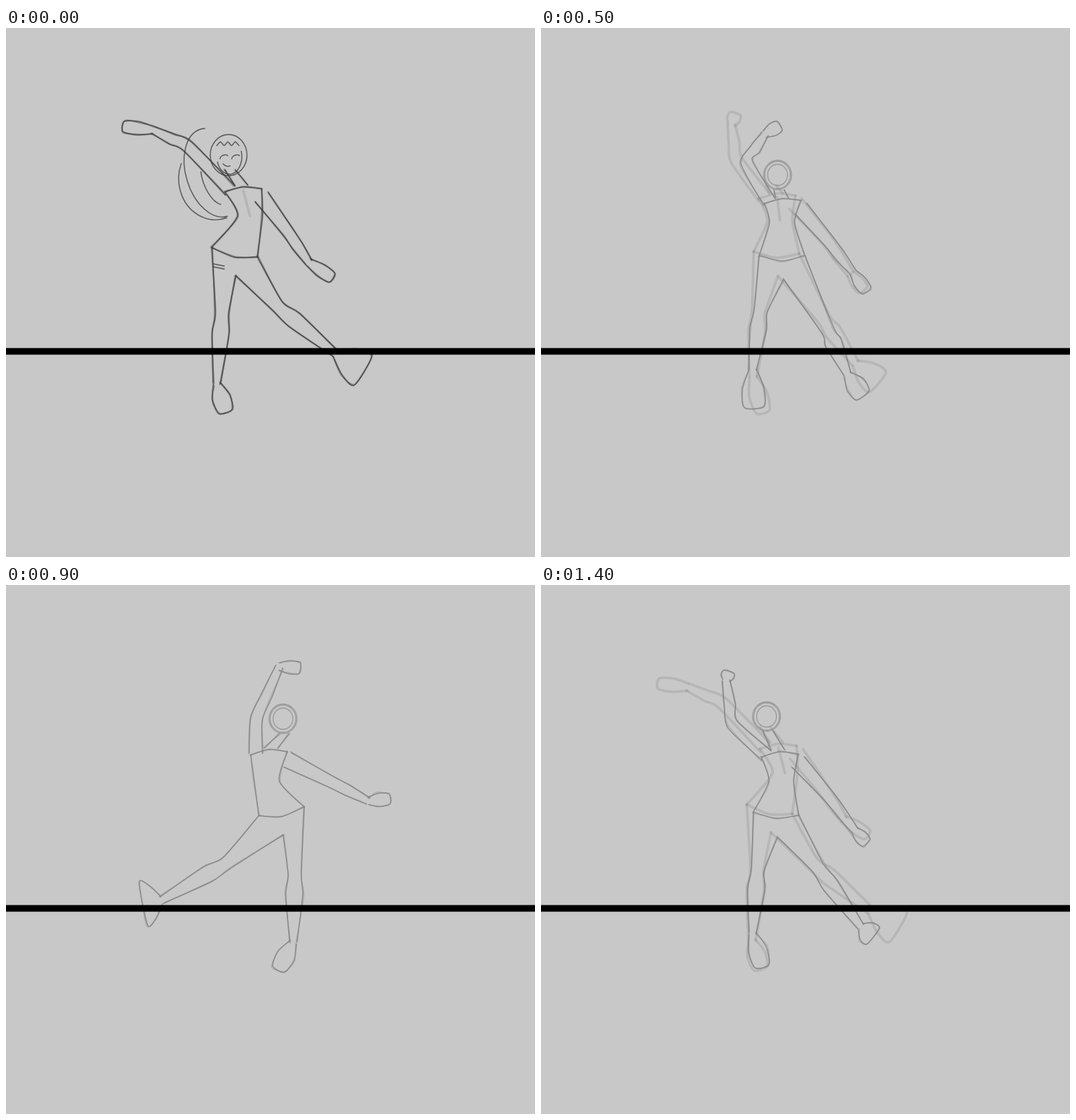
These frames come from a looping animation (720 by 720 pixels, 1.5 s). An HTML page with a canvas:

```html
<!DOCTYPE html>
<html lang="en">
<head>
<meta charset="utf-8">
<style>
  html, body { margin: 0; width: 100%; height: 100%; overflow: hidden; background: #c8c8c8; }
  canvas { display: block; }
</style>
</head>
<body>
<canvas id="stage" width="720" height="720"></canvas>
<script>
const ctx = document.getElementById('stage').getContext('2d');
const STEP = 100, STEPS = 15;
const GRAY = '#838383', DARK = '#3c3c3c';

// Key poses: only the joints. Outlines, drawings in between and detail follow by rule.
// "onion" names another step that shines through faintly.
const JOINTS = 'head chest waist pelvis elbowL wristL tipL elbowR wristR tipR kneeL ankleL toeL kneeR ankleR toeR'.split(' ');
const poses = [
  { at: 0, onion: 0, joints: '303,173 323,221 332,256 311,305 247,161 200,139 160,134 384,278 412,319 444,340 294,388 287,484 299,522 369,378 448,443 486,466' },
  { at: 3, joints: '303,185 316,222 325,259 315,302 255,173 217,120 203,101 388,283 420,331 440,349 292,390 286,485 306,524 377,378 436,442 473,467' },
  { at: 5, onion: 4, joints: '322,200 329,237 328,265 328,310 280,183 305,144 325,133 393,292 425,333 443,358 299,385 288,465 290,516 390,411 417,471 438,500' },
  { at: 7, joints: '341,187 339,228 342,268 348,311 313,170 350,127 357,109 412,270 452,302 484,321 290,390 261,468 229,480 374,389 385,473 381,521' },
  { at: 9, joints: '377,182 358,229 355,267 375,308 341,182 372,111 400,113 441,267 493,294 522,291 301,378 212,429 187,434 393,394 391,486 371,523' },
  { at: 11, joints: '357,186 356,224 354,263 362,306 328,179 357,123 379,103 430,278 463,301 497,319 311,378 271,442 248,462 390,402 390,481 370,523' },
  { at: 14, onion: 0, joints: '307,179 325,232 327,267 320,311 261,190 252,130 256,118 392,288 427,334 443,351 295,388 288,474 301,519 377,385 435,465 452,478' }
];
for (const pose of poses)
  pose.points = pose.joints.split(' ').map(p => p.split(',').map(Number));

const add = (p, x, y) => [p[0] + x, p[1] + y];
const mix = (a, b, u) => a.map((v, k) => v + (b[k] - v) * u);

// Joints at any step, on a closed spline through the key poses.
function jointsAt(step) {
  const n = poses.length, i = poses.findLastIndex(p => p.at <= step);
  const [a, b, c, d] = [-1, 0, 1, 2].map(k => poses[(i + k + n) % n]);
  const u = (step - b.at) / ((c.at || STEPS) - b.at);
  const spline = (p, q, r, s) => q + u / 2 * (r - p
    + u * (2 * p - 5 * q + 4 * r - s + u * (3 * (q - r) + s - p)));
  return Object.fromEntries(JOINTS.map((name, j) => [name, [0, 1].map(k =>
    spline(a.points[j][k], b.points[j][k], c.points[j][k], d.points[j][k]))]));
}

// Both edges of a band with the given half-width at each joint.
function edges(joints, widths) {
  return [1, -1].map(side => joints.map((p, i) => {
    const from = joints[Math.max(0, i - 1)], to = joints[Math.min(joints.length - 1, i + 1)];
    const dx = to[0] - from[0], dy = to[1] - from[1];
    const k = side * widths[i] / (Math.hypot(dx, dy) || 1);
    return add(p, -dy * k, dx * k);
  }));
}

function paddle(start, end, widths) {
  const [left, right] = edges([start, mix(start, end, 0.5), end], widths);
  return [...left, ...right.reverse()];
}

function arm(shoulder, elbow, wrist, tip, width) {
  const joints = [shoulder, elbow, mix(elbow, wrist, 0.45), wrist];
  return [...edges(joints, [width, 8, 7.5, 5]), paddle(wrist, tip, [5, 9, 7])];
}

function leg(tops, knee, ankle, toe) {
  const joints = [mix(...tops, 0.5), knee, mix(knee, ankle, 0.3), ankle];
  const sides = edges(joints, [0, 9, 11.5, 5]);
  sides.forEach((side, i) => { side[0] = tops[i]; });
  const flare = 9 + Math.max(0, 475 - ankle[1]) * 0.45; // a lifted foot shows its length
  return [...sides, paddle(ankle, toe, [5, flare / 2 + 8, flare])];
}

function figure(j) {
  const tilt = (j.waist[0] - j.pelvis[0]) * 0.3;
  const hipL = add(j.pelvis, -31, -tilt), hipR = add(j.pelvis, 31, tilt);
  const crotch = add(j.pelvis, 2, 32);
  const chestL = add(j.chest, -25, 2), chestR = add(j.chest, 25, -2);
  const neck = side => [add(j.head, 2 + side * 7, 20), add(mix(j.head, j.chest, 0.85), side * 9, 0)];
  return [
    [chestL, add(j.waist, -17, 0), hipL],
    [chestR, add(j.waist, 17, 0), hipR],
    [hipL, add(j.pelvis, 0, 7), hipR],
    [chestL, add(j.chest, 0, -5), chestR],
    neck(-1), neck(1),
    ...arm(add(chestL, 7, -2), j.elbowL, j.wristL, j.tipL, 9),
    ...arm(add(chestR, 0, 11), j.elbowR, j.wristR, j.tipR, 11),
    ...leg([hipL, crotch], j.kneeL, j.ankleL, j.toeL),
    ...leg([crotch, hipR], j.kneeR, j.ankleR, j.toeR)
  ];
}

function pen(color, width, alpha) {
  ctx.strokeStyle = color;
  ctx.lineWidth = width;
  ctx.globalAlpha = alpha;
}

function curve(points) {
  const at = i => points[Math.max(0, Math.min(points.length - 1, i))];
  ctx.beginPath();
  ctx.moveTo(...points[0]);
  for (let i = 0; i < points.length - 1; i++) {
    const [a, b, c, d] = [at(i - 1), at(i), at(i + 1), at(i + 2)];
    ctx.bezierCurveTo(
      b[0] + (c[0] - a[0]) / 8, b[1] + (c[1] - a[1]) / 8,
      c[0] - (d[0] - b[0]) / 8, c[1] - (d[1] - b[1]) / 8, ...c);
  }
  ctx.stroke();
}

function arc([x, y], rx, ry, from = 0, to = 2, turn = 0) {
  ctx.beginPath();
  ctx.ellipse(x, y, rx, ry, turn, from * Math.PI, to * Math.PI);
  ctx.stroke();
}

// Each line is drawn firmly once and loosely a second time.
function sketch(strokes, color, seed) {
  const wobble = n => Math.sin(seed * 12.9 + n * 78.2) * 1.6;
  strokes.forEach((stroke, i) => {
    pen(color, 1.5, 0.85);
    curve(stroke);
    pen(color, 1.3, 0.4);
    curve(stroke.map((p, k) => add(p, wobble(i + k * 3), wobble(i * 5 + k))));
  });
}

function hairAndFace(head, pelvis) {
  pen(DARK, 1.4, 0.8);
  arc(head, 25, 28);
  arc(add(head, -20, 24), 38, 62, 0.5, 1.55, -0.3);
  arc(add(head, -18, 32), 50, 56, 0.4, 1.12);
  arc(add(head, -16, 29), 20, 40, 0.6, 1.1, -0.3);
  arc(add(head, 1, 2), 17, 24, -0.1, 0.9);
  curve(Array.from({ length: 7 }, (_, i) => add(head, i * 5 - 16, -13 - i % 2 * 5)));
  for (const x of [-6, 10]) arc(add(head, x, 4), 6, 4, 1.1, 1.9, -0.4);
  arc(add(head, -2, 11), 6, 4, 0.2, 0.8, 0.3);
  for (const y of [16, 20]) curve([add(pelvis, -29, y), add(pelvis, -14, y + 3)]);
}

function draw(step) {
  const joints = jointsAt(step), pose = poses.find(p => p.at === step);
  const color = step === 0 ? DARK : GRAY;

  ctx.globalAlpha = 1;
  ctx.fillStyle = '#c8c8c8';
  ctx.fillRect(0, 0, 720, 720);
  ctx.lineCap = ctx.lineJoin = 'round';

  if (pose?.onion >= 0) {
    const other = jointsAt(pose.onion);
    pen('#707070', 3.5, 0.2);
    [...figure(other), [other.chest, other.waist]].forEach(curve);
  }
  sketch(figure(joints), color, step);
  if (step === 0) hairAndFace(joints.head, joints.pelvis);
  else for (const r of [20, 18.5, 14.5]) {
    pen(color, 1.3, 0.65);
    arc(joints.head, r - 1, r);
  }

  ctx.globalAlpha = 1;
  ctx.fillStyle = '#000';
  ctx.fillRect(0, 435.6, 720, 9);
}

function tick() {
  draw(Math.floor(performance.now() / STEP) % STEPS);
  requestAnimationFrame(tick);
}
tick();
</script>
</body>
</html>
```
